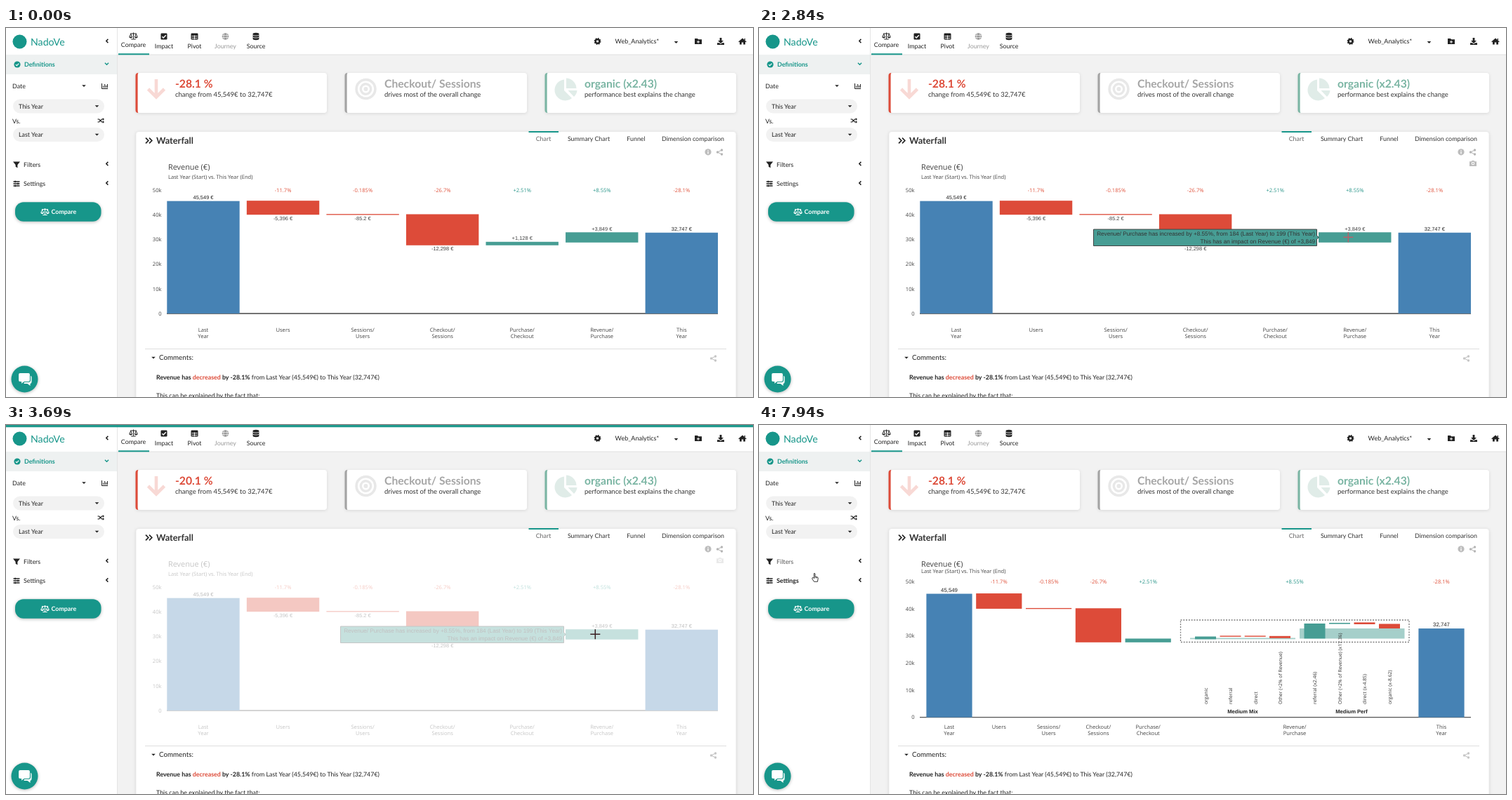
Write an HTML page that moves like this. It is 1064 by 526 pixels and loops after 8000 ms.

```html
<!DOCTYPE html>
<html lang="en">
<head>
<meta charset="utf-8">
<title>Waterfall drill-down</title>
<style>
html, body { margin: 0; width: 100%; height: 100%; overflow: hidden; background: #fff; }
svg { display: block; width: 1064px; height: 526px; }
text { white-space: pre; text-rendering: geometricPrecision; }
.ui { font-family: Lato, sans-serif; }
.plot { font-family: "Open Sans", sans-serif; }
.val { font-family: "Liberation Sans", Arial, sans-serif; }
.b { font-weight: 700; }
.card { filter: drop-shadow(0 1px 2px rgba(0,0,0,.11)); }
.lift { filter: drop-shadow(0 1.5px 2px rgba(0,0,0,.28)); }
#cross { mix-blend-mode: difference; }
</style>
</head>
<body>
<svg id="stage" viewBox="0 0 1064 526" xmlns="http://www.w3.org/2000/svg"></svg>
<script>
const TEAL = '#17968a', RED = '#dd4b39', BLUE = '#4682b4', GREEN = '#479d94', INK = '#222';

// Drawing helpers
const rect = (x, y, w, h, fill, extra = '') =>
  `<rect x="${x}" y="${y}" width="${w}" height="${h}" fill="${fill}" ${extra}/>`;
const bar = (x0, x1, y0, y1, fill) => rect(x0, y0, x1 - x0, y1 - y0, fill);
const text = (x, y, s, size, fill = INK, cls = 'ui', anchor = 'start', extra = '') =>
  `<text x="${x}" y="${y}" font-size="${size}" fill="${fill}" class="${cls}" text-anchor="${anchor}" ${extra}>` +
  s.replace(/</g, '&lt;') + '</text>';
const ui = (x, y, s, fill, cls = 'ui', anchor) => text(x, y, s, 8.9, fill, cls, anchor);
const mid = (x, y, s, fill = '#444', size = 7.6, cls = 'plot') => text(x, y, s, size, fill, cls, 'middle');
const group = (id, body, extra = '') => `<g id="${id}" ${extra}>${body}</g>`;
const at = (x, y, body) => `<g transform="translate(${x} ${y})">${body}</g>`;
const fillPath = (d, c) => `<path d="${d}" fill="${c}" fill-rule="evenodd"/>`;
const line = (d, c, w = 1.3) => `<path d="${d}" fill="none" stroke="${c}" stroke-width="${w}"/>`;
const dot = (r, c, extra = '') => `<circle r="${r}" fill="${c}" ${extra}/>`;

// Icons, centred on 0,0
const icon = {
  scales: c => line('M0-5V4M-3.2 4.5H3.2M-4.5-3.5H4.5M-5.6 1L-3.8-3L-2 1M2 1L3.8-3L5.6 1', c, 1) +
    fillPath('M-6.2 1h4.8a2.4 2 0 0 1-4.8 0zM1.4 1h4.8a2.4 2 0 0 1-4.8 0z', c),
  check: c => rect(-4.5, -4.5, 9, 9, c, 'rx="1.2"') + line('M-2.6 .2L-.8 2L2.8-1.8', '#fff', 1.4),
  table: c => rect(-5, -4.5, 10, 9, c, 'rx="1.2"') + line('M-4-.4H4M-4 2.4H4M0-1.6V4', '#fff', .9),
  globe: c => dot(4.8, c) + line('M-5-1.5H5M-5 1.5H5M-2-4.5Q-3.4 0-2 4.5M2-4.5Q3.4 0 2 4.5', '#fff', .6),
  data: c => fillPath('M-4.4-3.6A4.4 1.6 0 0 1 4.4-3.6V3.6A4.4 1.6 0 0 1-4.4 3.6z', c) +
    line('M-4.4-2A4.6 1.5 0 0 0 4.4-2M-4.4 1A4.6 1.5 0 0 0 4.4 1', '#fff', .8),
  gear: c => `<circle r="2.8" fill="none" stroke="${c}" stroke-width="2.4"/>` +
    `<circle r="4.2" fill="none" stroke="${c}" stroke-width="1.5" stroke-dasharray="1.65"/>`,
  folder: c => fillPath('M-5-4H-1L0-2.8H5V4H-5z', c) + line('M-2 .8H2M0-1.2V2.8', '#fff', 1),
  download: c => fillPath('M-1.4-5H1.4V-1H4L0 3L-4-1H-1.4zM-5 2.2H-2L0 4L2 2.2H5V5H-5z', c),
  home: c => fillPath('M0-4.6L5.8 .5L5 1.3L4 .5V4.5H1.2V1.5H-1.2V4.5H-4V.5L-5 1.3L-5.8 .5zM2.6-4H4V-1.5L2.6-2.7z', c),
  left: c => line('M1.4-2.6L-1.2 0L1.4 2.6', c, 1.5),
  down: c => line('M-2.6-1.3L0 1.3L2.6-1.3', c, 1.4),
  caret: c => fillPath('M-2.8-1.3H2.8L0 1.6z', c),
  chart: c => line('M-4-4V3.5H4.6M-1.8 2.2V-.5M.2 2.2V-3M2.2 2.2V-1.2M4 2.2V-3', c, 1),
  shuffle: c => line('M-4.5-2H-2.5L1.5 2H3.5M-4.5 2H-2.5L1.5-2H3.5', c, 1.2) +
    fillPath('M2.8-4L5-2L2.8 0zM2.8 0L5 2L2.8 4z', c),
  filter: c => fillPath('M-5-4.4H5L1.4 0V4.6L-1.4 2.6V0z', c),
  sliders: c => line('M-4.5-3H4.5M-4.5 0H4.5M-4.5 3H4.5', c, 1.3) + line('M-1.8-4.2V-1.8M2-1.2V1.2M-1.8 1.8V4.2', c, 1.6),
  share: c => line('M3-3L-3 0L3 3', c, 1.1) +
    [[3, -3], [-3, 0], [3, 3]].map(([x, y]) => at(x, y, dot(1.7, c))).join(''),
  info: c => dot(4.6, c) + line('M0-.8V2.7M0-2.7V-1.5', '#fff', 1.3),
  camera: c => fillPath('M-5-2.8H-2.4L-1.6-4H1.6L2.4-2.8H5V4H-5z', c) + dot(2.2, '#fff') + dot(1.2, c)
};
const put = (name, x, y, c = INK) => at(x, y, icon[name](c));

// Page chrome
function header() {
  const tabs = [['scales', 181.5, 'Compare'], ['check', 225, 'Impact'], ['table', 268.5, 'Pivot'],
    ['globe', 312.5, 'Journey'], ['data', 356, 'Source']];
  let s = rect(0, 0, 1064, 38, '#fff') + rect(159, 37.5, 905, 1, '#e2e2e2');
  tabs.forEach(([name, x, label], i) => {
    const c = name === 'globe' ? '#999' : INK;
    s += put(name, x, i ? 12 : 11.5, c) + ui(x, i ? 28.7 : 27.4, label, c, 'ui', 'middle');
  });
  s += rect(160, 36.3, 44, 2, TEAL);
  s += put('gear', 842.5, 19) + text(867.6, 22.2, 'Web_Analytics*', 9) + put('caret', 954.5, 20.3);
  return s + put('folder', 986, 19) + put('download', 1018, 19) + put('home', 1049, 19);
}

function chatBubble() {
  const front = 'M-6.5-9H5.5Q8-9 8-6.5V1.5Q8 4 5.5 4H-.5L-5 7.5V4H-6.5Q-9 4-9 1.5V-6.5Q-9-9-6.5-9z';
  const back = 'M0-5H7.5Q10-5 10-2.5V4Q10 6.3 8 6.5V9.5L4 6.5H-1z';
  return fillPath(back, '#fff') + `<path d="${front}" fill="#fff" stroke="${TEAL}" stroke-width="1.2"/>`;
}

function sidebar() {
  let s = rect(0, 0, 158.5, 526, '#fff') + rect(158, 0, 1, 526, '#e4e4e4');
  s += at(19.5, 19.5, dot(10, TEAL)) + text(35, 25, 'NadoVe', 14.2, TEAL) + put('left', 144, 18.5);
  s += rect(0, 38, 158, 28, '#eef1f1') + at(16, 52, dot(4.6, TEAL) + line('M-2.2 .1L-.6 1.7L2.3-1.4', '#fff', 1.2));
  s += ui(26, 55, 'Definitions', TEAL, 'ui b') + put('down', 143.5, 51, TEAL);
  s += ui(9, 85.5, 'Date') + put('caret', 111, 82.5) + put('chart', 140.5, 83);
  [['This Year', 101.5], ['Last Year', 142]].forEach(([label, y]) => {
    s += rect(10, y, 130, 20, '#f2f2f2', 'rx="10"') + ui(18, y + 13.2, label) + put('caret', 129.5, y + 10);
  });
  s += ui(9, 135.5, 'Vs.') + put('shuffle', 135, 132);
  s += put('filter', 15, 195) + text(25, 198, 'Filters', 8.9, INK, 'ui', 'start', 'id="filters"') + put('left', 144, 193.5);
  s += put('sliders', 15, 222) + text(25, 225.3, 'Settings', 8.9, INK, 'ui', 'start', 'id="settings"') + put('left', 144, 221);
  s += rect(13, 248.3, 122.5, 27.5, TEAL, 'rx="12" class="lift"') + put('scales', 55.5, 262, '#fff');
  s += ui(64.5, 265.2, 'Compare', '#fff', 'ui b');
  return s + at(26.5, 500.5, dot(19, TEAL, 'class="lift"') + chatBubble());
}

function cards() {
  const list = [
    [185, 272, 241, RED, RED, '-28.1 %', 'change from 45,549€ to 32,747€'],
    [483, 259, 539, '#a3a3a3', '#a6a6a6', 'Checkout/ Sessions', 'drives most of the overall change'],
    [768, 272, 824, '#7ab5a3', '#7ab5a3', 'organic (x2.43)', 'performance best explains the change']
  ];
  let s = '';
  list.forEach(([x, w, tx, edge, c, title, sub], i) => {
    s += rect(x, 64, w, 57, '#fff', 'rx="4" class="card"');
    s += fillPath(`M${x + 3.5} 64Q${x + 2.6} 65 ${x + 2.6} 68V117Q${x + 2.6} 120 ${x + 3.5} 121` +
      `Q${x - .5} 121 ${x - .5} 117V68Q${x - .5} 64 ${x + 3.5} 64z`, edge);
    s += text(tx, 85, title, 15.7, c, 'ui b', 'start', i ? '' : 'id="change"') + text(tx, 98.2, sub, 9.5, '#333');
  });
  s += at(214, 87, line('M0-14V11M-11.5 0L0 11.5L11.5 0', '#f8d9d5', 4.6));
  s += at(512.5, 87, dot(13.4, 'none', 'stroke="#e8e8e8" stroke-width="3.6"') +
    dot(7.2, 'none', 'stroke="#e8e8e8" stroke-width="3.4"') + dot(3, '#e8e8e8'));
  s += at(796.5, 87.5, fillPath('M-1.5-14V1.5L9.5 12.5A15 15 0 1 1-1.5-14zM1.5-16A15 15 0 0 1 16-1.5H1.5z' +
    'M4 1.5H17A15 15 0 0 1 12.5 10.5z', '#e0ece8'));
  return s;
}

function panel() {
  let s = rect(185, 147.5, 855, 400, '#fff', 'rx="4" stroke="#e4e4e4" stroke-width=".7" class="card"');
  s += at(204, 160.5, line('M-5-3.8L-1.2 0L-5 3.8M0-3.8L3.8 0L0 3.8', INK, 1.7));
  s += text(214, 165, 'Waterfall', 12.8, '#333', 'ui b');
  s += rect(744.5, 147, 42.5, 2, TEAL);
  [[765.5, 'Chart'], [830, 'Summary Chart'], [897.5, 'Funnel'], [978.5, 'Dimension comparison']]
    .forEach(([x, label], i) => s += ui(x, 161.3, label, i ? '#333' : '#666', 'ui', 'middle'));
  s += put('info', 1000, 176.8, '#bdbdbd') + put('share', 1016.5, 177, '#b5b5b5');
  s += rect(198, 457, 828, 1, '#dedede') + put('caret', 210, 470) + text(218, 473, 'Comments:', 9.8);
  s += put('share', 1007.5, 471, '#c6c6c6');
  s += `<text x="214" y="501" font-size="8.87" class="ui" fill="${INK}"><tspan class="b">Revenue has ` +
    `<tspan fill="${RED}">decreased</tspan> by -28.1%</tspan> from Last Year (45,549€) to This Year (32,747€)</text>`;
  return s + ui(214, 527, 'This can be explained by the fact that:');
}

// Charts
const steps = [
  ['Last|Year', 0, 45549], ['Users', 45549, 40153, '-11.7%', '-5,396 €'],
  ['Sessions/|Users', 40153, 40068, '-0.185%', '-85.2 €'],
  ['Checkout/|Sessions', 40068, 27770, '-26.7%', '-12,298 €'],
  ['Purchase/|Checkout', 27770, 28898, '+2.51%', '+1,128 €'],
  ['Revenue/|Purchase', 28898, 32747, '+8.55%', '+3,849 €'],
  ['This|Year', 0, 32747, '-28.1%']
];
const total = v => v.toLocaleString('en-US');

function frame(zero, scale, subY) {
  let s = text(231, 202.3, 'Revenue (€)', 10.9, '#444', 'plot') +
    text(231, subY, 'Last Year (Start) vs. This Year (End)', 7.6, '#444', 'plot');
  for (let k = 0; k <= 5; k++)
    s += text(221.5, zero - k * scale * 10 + 2.7, k ? k + '0k' : '0', 7.6, '#444', 'plot', 'end');
  return s;
}

function column(step, x, half, zero, scale, pctY, drawBar) {
  const [name, from, to, pct] = step;
  const edge = from ? .5 : 0; // changes carry an outline, totals do not
  const a = zero - from * scale / 1000, b = zero - to * scale / 1000;
  const top = Math.min(a, b) - edge, low = Math.max(a, b) + edge;
  const c = from === 0 ? BLUE : to > from ? GREEN : RED;
  let s = drawBar ? bar(x - half, x + half, top, low, c) : '';
  if (pct) s += mid(x, pctY, pct, pct[0] === '+' ? '#2a968a' : '#e0553f');
  name.split('|').forEach((part, i) => s += mid(x, 432.6 + i * 9.6, part));
  return { s, top, low };
}

function overview() {
  const zero = 407, scale = 3.52;
  let s = frame(zero, scale, 214.6);
  s += line(`M229 ${zero}H1014`, '#444', 1.4);
  steps.forEach((step, i) => {
    const x = 281 + i * 113.55, c = column(step, x, 51.7, zero, scale, 233.6, true);
    const [, from, to, , label] = step;
    s += c.s + mid(x, from > to ? c.low + 7.6 : c.top - 2.6, label || total(to) + ' €', label ? '#444' : INK, 7.45, 'val');
  });
  const box = `M476.5 287H794.5V296L797.5 298.5L794.5 301V310.5H476.5z`;
  const tip = `<path d="${box}" fill="${GREEN}" stroke="#444" stroke-width="1"/>` +
    text(792, 296.3, 'Revenue/ Purchase has increased by +8.55%, from 184 (Last Year) to 199 (This Year)', 8.17, '#333', 'val', 'end') +
    text(792, 306.8, 'This has an impact on Revenue (€) of +3,849', 8.17, '#333', 'val', 'end');
  return s + group('tip', tip);
}

function drilldown() {
  const zero = 416.7, scale = 3.867;
  let s = frame(zero, scale, 210.6);
  s += line(`M229 ${zero}H1014`, '#555', 1.2);
  steps.forEach((step, i) => {
    const x = i < 5 ? 271 + i * 70.8 : i === 5 ? 763 : 972;
    const c = column(step, x, 32.6, zero, scale, 226.4, i !== 5);
    s += c.s + (step[1] ? '' : mid(x, c.top - 2.8, total(step[2]), INK, 7.8, 'val'));
  });
  s += bar(614, 764, 303.5, 305.3, '#a5cfca') + bar(770, 919.5, 290, 304.5, '#a5cfca');
  const parts = [
    [636, 301.5, 305.4, GREEN, 'organic'], [671.5, 300.4, 301.8, RED, 'referral'],
    [706.7, 300.4, 301.8, RED, 'direct'], [742, 300.8, 303.8, RED, 'Other (<2% of Revenue)'],
    [791.5, 283, 304.4, GREEN, 'referral (x2.46)'], [827, 282, 283.6, GREEN, 'Other (<2% of Revenue) (x17.36)'],
    [862.5, 281.4, 284, RED, 'direct (x-4.85)'], [898, 283.5, 290, RED, 'organic (x-8.62)']
  ];
  parts.forEach(([x, y0, y1, c, label]) => {
    s += bar(x - 15, x + 15, y0, y1, c);
    s += text(0, 0, label, 6.8, '#333', 'plot', 'start', `transform="translate(${x + 2.8} 398) rotate(-90)"`);
  });
  s += rect(600.5, 278, 325.5, 31.5, 'none', 'stroke="#777" stroke-width="1.3" stroke-dasharray="1.9"');
  return s + mid(689, 411, 'Medium Mix', INK, 7.6, 'val b') + mid(844, 411, 'Medium Perf', INK, 7.6, 'val b');
}

const pointer = d => `<path d="${d}" fill="#fff" stroke="#222" stroke-width=".9" stroke-linejoin="round"/>`;
const hand = pointer('M-1.6-6Q-.2-6.6 0-5V-1.2L3.2-.6Q4.4-.2 4.2 1.2L3.4 5.8H-1.6L-4.3 1.6Q-4.4 .2-3-.2L-1.6 1.2z') +
  line('M-.1-1.2V1M1.4-.9V1M2.8-.6V1', '#222', .6);

const stage = document.getElementById('stage');
stage.innerHTML = rect(0, 0, 1064, 526, '#f2f2f2') + header() + sidebar() + cards() + panel() +
  group('overview', overview()) + group('drilldown', drilldown()) +
  group('camera', put('camera', 1017, 193, '#bcbcbc')) +
  rect(0, 0, 1064, 3.2, TEAL, 'id="loader"') +
  group('cross', line('M-7 0H7M0-7V7', '#fff', 1.5)) +
  group('arrow', pointer('M0 0V10L2.4 7.8L4 11.2L5.6 10.4L4.1 7.2H7.2z')) +
  group('hand', hand);

const el = id => document.getElementById(id);
const show = (id, on) => el(id).setAttribute('visibility', on ? 'visible' : 'hidden');
const opacity = (id, v) => el(id).setAttribute('opacity', v);

// Pointer moves: start, end, number of hops, way points
const moves = [
  [430, 1210, 11, [[950, 401], [925, 385], [895, 352], [870, 325], [858, 314]]],
  [1310, 1460, 3, [[858, 314], [853, 312]]],
  [1680, 1840, 3, [[853, 312], [841, 300]]],
  [1990, 2080, 2, [[841, 300], [839.3, 298.3]]],
  [5330, 6100, 11, [[839.3, 298.3], [800, 318], [766, 345], [830, 367], [965, 340], [930, 330], [893, 324]]],
  [6200, 6440, 4, [[893, 324], [900.5, 315.5]]],
  [6610, 6840, 4, [[900.5, 315.5], [800, 305], [696, 321]]],
  [6990, 7150, 3, [[696, 321], [800, 304]]],
  [7380, 7940, 8, [[800, 304], [740, 303], [640, 296], [520, 280], [395, 258], [270, 232], [165, 208], [95, 198], [80, 217.5]]]
];

function pointerAt(t) {
  const move = moves.filter(m => t >= m[0]).pop();
  if (!move) return null;
  const [t0, t1, hops, pts] = move;
  const hop = Math.min(hops, Math.floor((t - t0) / (t1 - t0) * (hops - 1) + 1e-6) + 1);
  const u = hop / hops * (pts.length - 1), i = Math.min(Math.floor(u), pts.length - 2), f = u - i;
  return pts[i].map((v, k) => v + (pts[i + 1][k] - v) * f);
}

function render(t) {
  const p = pointerAt(t);
  const shape = !p ? '' : p[0] > 225 ? 'cross' : p[0] > 159 ? 'arrow' : 'hand';
  ['cross', 'arrow', 'hand'].forEach(id => show(id, id === shape));
  if (p) el(shape).setAttribute('transform', `translate(${p[0]} ${p[1]})`);

  // Recalculation: counter, top bar and chart fade advance in shared ticks
  const tick = Math.floor((t - 3000) / 77);
  const busy = tick >= 0 && tick < 10;
  const grow = busy ? Math.min(1, (tick + .905) / 10.526) ** 2 : 1;
  el('change').textContent = `-${(28.1 * grow).toFixed(1)} %`;
  const flash = (t >= 2450 && t < 2530) || (t >= 2760 && t < 2840);
  opacity('loader', busy ? .33 + .08 * tick : flash ? .3 : 0);
  const fade = Math.max(0, Math.min(1, (3000 + tick * 77 - 3325) / 250));
  const dim = .3 + .7 * (1 - fade) ** 2.25;

  const drilled = t >= 4150;
  show('overview', !drilled);
  show('drilldown', drilled);
  show('tip', !drilled && t >= 1760);
  opacity('overview', dim);
  show('camera', shape === 'cross');
  opacity('camera', !drilled ? dim : t < 4240 ? .35 : 1);

  const overFilters = t >= 7860 && t < 7940, overSettings = t >= 7940;
  el('filters').setAttribute('class', overFilters ? 'ui b' : 'ui');
  el('filters').setAttribute('fill', overSettings ? '#555' : INK);
  el('settings').setAttribute('class', overSettings ? 'ui b' : 'ui');
}

const start = performance.now();
function loop() {
  render((performance.now() - start) % 8000);
  requestAnimationFrame(loop);
}
loop();
</script>
</body>
</html>
```
